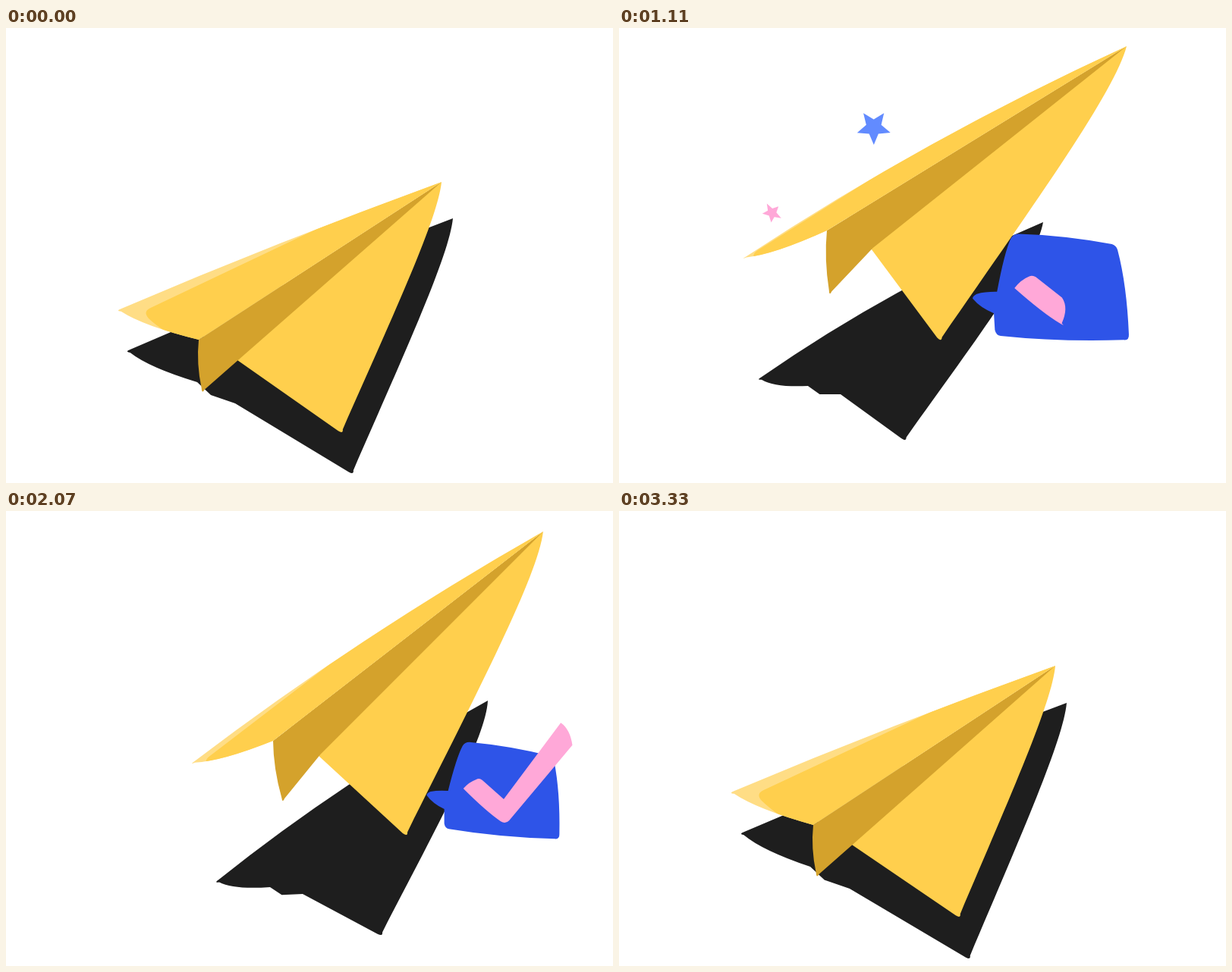
Animation of 800x600 px, one loop 3360 ms. Source, as an HTML page with a canvas:

```html
<!DOCTYPE html>
<html lang="en">
<head>
<meta charset="utf-8">
<title>Paper plane</title>
<style>
  html, body { margin: 0; width: 800px; height: 600px; overflow: hidden; background: #fff; }
  canvas { display: block; }
</style>
</head>
<body>
<canvas id="stage" width="800" height="600"></canvas>
<script>
const ctx = document.getElementById('stage').getContext('2d');
const LOOP = 3360, STEP = 30;
const YELLOW = '#ffcf4d', PALE = '#ffdd85', OCHRE = '#d4a22c', BLACK = '#1e1e1e';
const GREEN = '#b0f65e', PINK = '#ffa8d8', SKY = '#628bff', BLUE = '#2e54e8';

// Each track lists x, y at every key time.
const TIMES = [0, 600, 1110, 1650, 2070, 2580, 3330];
const tracks = {
  nose:   [574,203, 617,72, 669,24, 704,9, 708,27, 668,89, 575,204],
  left:   [147,372, 138,311, 163,304, 216,319, 244,333, 225,332, 147,371],
  crease: [254,411, 244,290, 274,267, 326,278, 352,303, 338,344, 256,414],
  keel:   [258,480, 247,369, 277,351, 334,361, 364,383, 349,418, 260,482],
  right:  [442,534, 390,430, 423,412, 487,413, 527,428, 535,460, 448,536],
  shadeNose:  [589,251, 554,223, 559,256, 606,254, 635,250, 631,247, 590,253],
  shadeLeft:  [159,426, 162,418, 183,463, 245,484, 276,489, 249,471, 160,425],
  shadeIn:    [252,467, 233,433, 249,472, 312,489, 348,496, 331,490, 252,469],
  shadeOut:   [302,495, 280,448, 292,483, 356,498, 391,505, 380,506, 304,498],
  shadeRight: [456,588, 369,516, 376,544, 446,553, 494,560, 506,572, 461,591],
  bubble: [530,350, 540,345, 582,344, 624,351, 655,370, 685,426, 690,520]
};

const clamp = x => Math.max(0, Math.min(1, x));
const ramp = (t, a, b) => clamp((t - a) / (b - a));
const smooth = u => u * u * (3 - 2 * u);
const lerp = (a, b, k) => a + (b - a) * k;
const mix = (p, q, k) => [lerp(p[0], q[0], k), lerp(p[1], q[1], k)];
const add = (p, x, y) => [p[0] + x, p[1] + y];
const toward = (p, q, d) => mix(p, q, d / Math.hypot(q[0] - p[0], q[1] - p[1]));

// Point at fraction k of p-q, pushed sideways by d.
function side(p, q, k, d) {
  const dx = q[0] - p[0], dy = q[1] - p[1], len = Math.hypot(dx, dy);
  return add(mix(p, q, k), dy / len * d, -dx / len * d);
}

// Periodic Hermite curve with averaged slopes.
function pose(track, t) {
  const n = TIMES.length;
  let i = n - 1;
  while (TIMES[i] > t) i--;
  const time = k => TIMES[(k + n) % n] + Math.floor(k / n) * LOOP;
  const h = time(i + 1) - time(i), u = (t - time(i)) / h;
  return [0, 1].map(axis => {
    const val = k => track[(k + n) % n * 2 + axis];
    const slope = k => (val(k + 1) - val(k)) / (time(k + 1) - time(k));
    const tangent = k => (slope(k - 1) + slope(k)) / 2 * h;
    const e = smooth(u);
    return lerp(val(i), val(i + 1), e)
      + tangent(i) * u * (1 - u) ** 2 - tangent(i + 1) * u * u * (1 - u);
  });
}

const move = p => ctx.moveTo(...p);
const line = p => ctx.lineTo(...p);
const quad = (c, p) => ctx.quadraticCurveTo(...c, ...p);
const corner = (from, p, to) => {
  line(toward(p, from, 5));
  quad(toward(p, from, -3), toward(p, to, 5));
};
function shape(color, draw) {
  ctx.beginPath();
  draw();
  ctx.closePath();
  ctx.fillStyle = color;
  ctx.fill();
}

const upperControl = (nose, left, flex) => side(nose, left, .5, -6 - 16 * flex);
function upperEdge(nose, left, inner, flex) {
  move(nose);
  quad(upperControl(nose, left, flex), toward(left, nose, 5));
  corner(nose, left, inner);
  quad(side(left, inner, .35, -8), inner);
}
function outerEdge(nose, right, flex) {
  const bow = .7 + .3 * flex;
  ctx.bezierCurveTo(...side(right, nose, .5, -9 * bow),
    ...side(right, nose, .87, -19 * bow), ...nose);
}

function drawShadow(p, flex) {
  shape(BLACK, () => {
    upperEdge(p.shadeNose, p.shadeLeft, p.shadeIn, flex);
    line(add(mix(p.shadeIn, p.shadeOut, .36), 0, 7));
    line(p.shadeOut);
    corner(p.shadeOut, p.shadeRight, p.shadeNose);
    outerEdge(p.shadeNose, p.shadeRight, flex);
  });
}

function drawPlane({ nose, left, crease, keel, right }, flex) {
  shape(YELLOW, () => {
    move(nose);
    line(mix(crease, nose, .02 + .05 * flex));
    corner(crease, right, nose);
    outerEdge(nose, right, flex);
  });

  const join = add(mix(keel, nose, .147), 0, -13 * flex);
  shape(OCHRE, () => {
    move(nose);
    line(crease);
    quad(side(crease, keel, .45, -5), toward(keel, crease, 5));
    corner(crease, keel, join);
    line(join);
  });

  ctx.save();
  shape(PALE, () => upperEdge(nose, left, crease, flex));
  ctx.clip();
  const control = upperControl(nose, left, flex), k = .38 + .28 * flex;
  const first = mix(nose, control, k);
  const split = mix(first, mix(control, left, k), k);
  const fold = add(left, 35 - 23 * flex, 1 - 7 * flex);
  shape(YELLOW, () => {
    move(nose);
    quad(first, split);
    line(toward(fold, split, 9));
    quad(add(fold, -2, 1), add(fold, 6, 10));
    quad(add(fold, 14, 18), add(mix(left, crease, .62), 0, 6));
    line(add(crease, 0, 3));
    line(crease);
  });
  ctx.restore();
}

function drawStar(color, t, star) {
  const u = ramp(t, star.start, star.start + star.life);
  if (u <= 0 || u >= 1) return;
  const e = 1 - (1 - u) ** 2;
  const [a, b, c] = star.path;
  const size = star.size * (1 - u) * clamp(u / .1);
  ctx.save();
  ctx.translate(...mix(mix(a, b, e), mix(b, c, e), e));
  ctx.rotate((star.turn + 96 * u) * Math.PI / 180);
  ctx.scale(1, star.squash);
  shape(color, () => {
    for (let i = 0; i < 10; i++) {
      const r = size * (i % 2 ? .45 : 1), angle = (i * 36 - 90) * Math.PI / 180;
      line([r * Math.cos(angle), r * Math.sin(angle)]);
    }
  });
  ctx.restore();
}

// Near pair of corners, then far pair.
const streaks = [
  [[133,333], [150,332], [86,392], [69,394]],
  [[178,332], [201,325], [143,391], [123,395]],
  [[308,373], [329,396], [281,452], [264,424]],
  [[340,424], [353,437], [294,516], [284,488]]
];
function drawStreaks(t) {
  const head = smooth(ramp(t, 420, 540)), tail = smooth(ramp(t, 600, 780));
  if (head <= tail) return;
  for (const [a, b, c, d] of streaks) {
    const q = [mix(a, d, tail), mix(b, c, tail), mix(b, c, head), mix(a, d, head)];
    shape(GREEN, () => {
      move(mix(q[0], q[3], .06));
      quad(q[0], mix(q[0], q[1], .3));
      line(mix(q[1], q[0], .2));
      quad(q[1], mix(q[1], q[2], .05));
      line(mix(q[2], q[1], .03));
      quad(q[2], mix(q[2], q[3], .2));
      line(q[3]);
    });
  }
}

function drawBubble(t, center) {
  const grow = smooth(ramp(t, 930, 1110)), settle = smooth(ramp(t, 1110, 1320));
  const swell = smooth(ramp(t, 2400, 2580)), leave = smooth(ramp(t, 2580, 2870));
  const scale = (1.165 * grow - .16 * settle + .169 * swell) * (1 - leave);
  if (scale <= 0) return;
  ctx.save();
  ctx.translate(...center);
  ctx.rotate(-.06 * (1 - settle));
  ctx.scale(scale, scale);
  ctx.fillStyle = BLUE;
  ctx.fill(new Path2D('M-72-1Q-61-45-53-60Q-50-65-44-65Q10-60 61-47Q66-45 67-40' +
    'Q75 0 74 56Q74 63 68 62Q-5 60-71 49Q-76 48-77 42L-77 23Q-92 16-100 5Q-100 2-95 0Q-85-2-72-1Z'));

  const short = ramp(t, 1050, 1110), long = smooth(ramp(t, 1110, 1260));
  if (short > 0) shape(PINK, () => {
    move([-52, -4]);
    quad([-44, -13], [-35, -16]);
    quad([-31, -18], [-27, -15]);
    if (short < 1) {
      line(mix([-27, -15], [1, 10], short));
      line(mix([-52, -4], [-2, 39], short));
    } else {
      line([1, 10]);
      const end = mix([1, 10], [77, -92], long);
      line(toward(end, [1, 9.9], Math.min(2, 100 * long)));
      quad(mix([8, 22], [88, -82], long), mix([-1, 39], [91, -61], long));
      if (long > 0) line(mix([-1, 39], [8, 38], long));
      quad([3, 43], [-3, 39]);
      quad([-22, 26], [-52, -4]);
    }
  });
  ctx.restore();
}

const pinkStar = { start: 460, life: 940, size: 46, turn: -21, squash: .85,
  path: [[440, 190], [292, 122], [180, 270]] };
const blueStar = { start: 960, life: 860, size: 28, turn: 19, squash: 1,
  path: [[440, 150], [261, 77], [178, 275]] };

function render(t) {
  const p = {};
  for (const name in tracks) p[name] = pose(tracks[name], t);
  const flex = clamp((411 - p.crease[1]) / 140);
  ctx.fillStyle = '#fff';
  ctx.fillRect(0, 0, 800, 600);
  drawShadow(p, flex);
  drawStar(PINK, t, pinkStar);
  drawStar(SKY, t, blueStar);
  drawPlane(p, flex);
  drawStreaks(t);
  drawBubble(t, p.bubble);
}

const start = performance.now();
function tick() {
  const t = (performance.now() - start) % LOOP;
  render(Math.floor(t / STEP) * STEP);
  requestAnimationFrame(tick);
}
tick();
</script>
</body>
</html>
```
